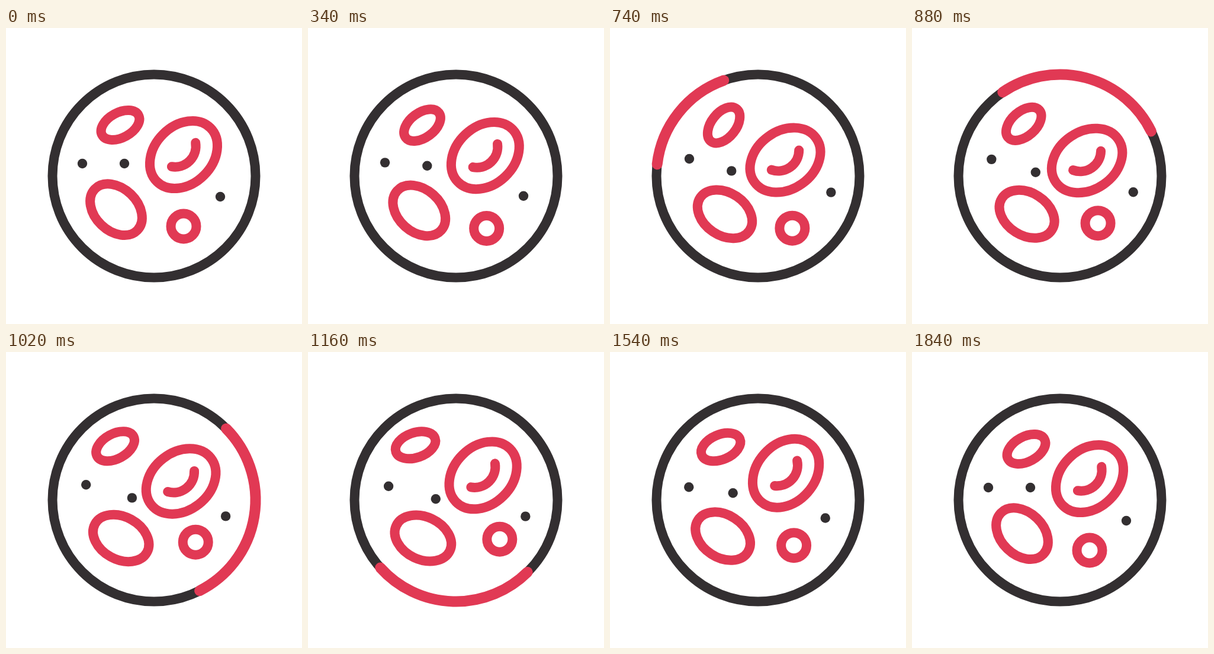
Animation of 500 by 500 pixels, one loop 1980 ms. Source, as an HTML page:

```html
<!DOCTYPE html>
<html lang="en">
<head>
<meta charset="utf-8">
<title>Cells under a lens</title>
<style>
  html, body { margin: 0; width: 100%; height: 100%; overflow: hidden; background: #fff; }
  svg { display: block; width: 100%; height: 100%; }
  .line { fill: none; stroke: #e13954; stroke-width: 16; stroke-linecap: round; }
  .rim { stroke: #332f31; }
  .sweep { stroke-width: 18; }
  .dot { fill: #332f31; }
</style>
</head>
<body>
<svg viewBox="0 0 500 500">
  <circle class="line rim" cx="250" cy="250" r="171.5"/>
  <path id="sweep" class="line sweep"/>
  <g transform="translate(193 164)">
    <g id="small"><ellipse class="line" rx="35" ry="21" transform="rotate(-28.6)"/></g>
  </g>
  <g transform="translate(300 214)">
    <g id="big">
      <g transform="rotate(-45)">
        <ellipse class="line" rx="64" ry="49"/>
        <path class="line" d="M-28.5 0A35 35 0 0 0 28.5 0"/>
      </g>
    </g>
  </g>
  <g transform="translate(186 306.7)">
    <g id="low"><ellipse class="line" rx="50" ry="36" transform="rotate(44)"/></g>
  </g>
  <g transform="translate(300 335)"><circle id="ring" class="line" r="21.5"/></g>
  <g transform="translate(129 229)"><circle id="dotA" class="dot" r="8.2"/></g>
  <g transform="translate(200 229)"><circle id="dotB" class="dot" r="8.2"/></g>
  <g transform="translate(362 285)"><circle id="dotC" class="dot" r="8.2"/></g>
</svg>
<script>
const LOOP = 1980, TICK = 20, START = 167, END = 1833;
const el = id => document.getElementById(id);

function ease(t, from, to) {
  const x = Math.min(1, Math.max(0, (t - from) / (to - from)));
  return x * x * (3 - 2 * x);
}

// Floats from home to a near pose, on to a far pose and home again.
// The far pose falls halfway between the near pose and the end.
function drift(id, nearTime, near, far) {
  const node = el(id), farTime = (nearTime + END) / 2;
  return t => {
    const toNear = ease(t, START, nearTime);
    const toFar = ease(t, nearTime, farTime);
    const toHome = ease(t, farTime, END);
    const mix = n => (near[n] || 0) * (toNear - toFar) + (far[n] || 0) * (toFar - toHome);
    node.setAttribute('transform', `translate(${mix(0)} ${mix(1)}) rotate(${mix(2)})`);
  };
}

// Poses: x, y and turn away from home
const drawers = [
  drift('small', 640, [0, 0.5, -26], [-12, -7, 11]),
  drift('big', 870, [-4.4, 10, 10.5], [-4.4, -14, -5]),
  drift('low', 733, [8, 7.6, -10], [8.4, 7.9, -20]),
  drift('ring', 560, [4, 8.5], [24, -19]),
  drift('dotA', 760, [5, -8], [7.5, -1.2]),
  drift('dotB', 620, [4, 11.6], [16.2, 19.5]),
  drift('dotC', 833, [12, -7.8], [2.8, -7.2]),
  drawSweep
];

// Point on the rim, as a share of a clockwise turn from the left
function rimPoint(share) {
  const a = Math.PI * (1 + 2 * share);
  return `${250 + 171.5 * Math.cos(a)} ${250 + 171.5 * Math.sin(a)}`;
}

// The tail repeats the head's lap a little later
function drawSweep(t) {
  const lap = 833, lag = 169, begin = 504;
  const head = ease(t, begin, begin + lap);
  const tail = ease(t - lag, begin, begin + lap);
  el('sweep').setAttribute('d', head - tail < 0.0005 ? '' :
    `M${rimPoint(tail)}A171.5 171.5 0 0 1 ${rimPoint(head)}`);
}

const began = performance.now();
function draw() {
  const t = Math.floor((performance.now() - began) % LOOP / TICK) * TICK;
  for (const d of drawers) d(t);
  requestAnimationFrame(draw);
}
draw();
</script>
</body>
</html>
```
